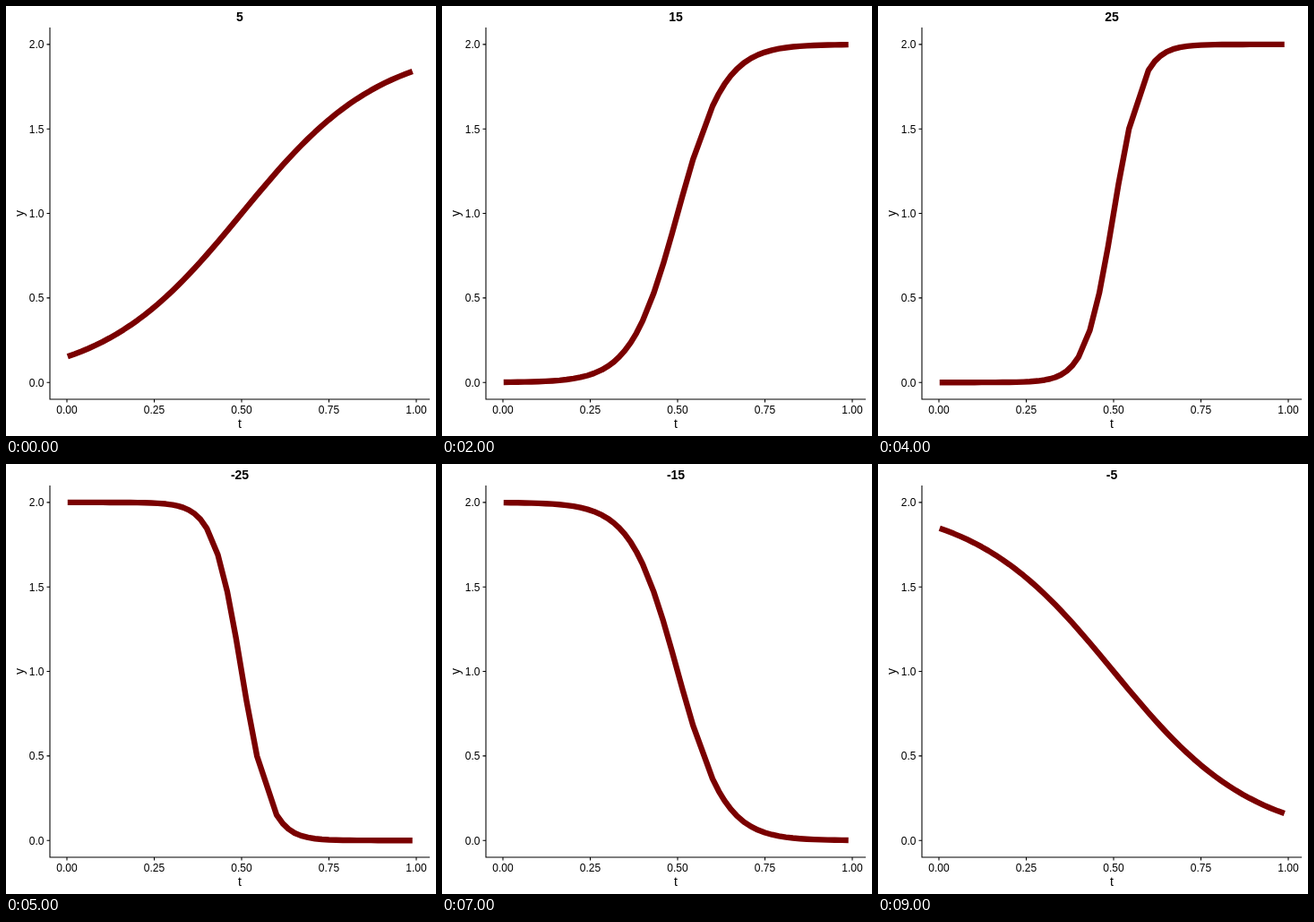
An HTML page for the animation above (10 s loop, 480 by 480 pixels).

```html
<!DOCTYPE html>
<html lang="en">
<head>
<meta charset="utf-8">
<title>Logistic curve</title>
<style>
  html, body { margin: 0; width: 100%; height: 100%; overflow: hidden; background: #fff; }
  svg { display: block; width: 100%; height: 100%; }
  text { font: 12px "Liberation Sans", Arial, sans-serif; text-anchor: middle; }
  .name { font-size: 14px; }
  #title { font-size: 14px; font-weight: bold; }
  #axes { fill: none; stroke: #000; stroke-width: 1.07; }
  #curve { fill: none; stroke: #7a0000; stroke-width: 6.4; stroke-linejoin: round; }
</style>
</head>
<body>
<svg viewBox="0 0 480 480">
  <path id="curve"/>
  <path id="axes"/>
  <g id="labels"></g>
  <text id="title" x="261" y="17"></text>
  <text class="name" x="261" y="471">t</text>
  <text class="name" transform="translate(19.5 231.5) rotate(-90)">y</text>
</svg>
<script>
const STEP = 1000;
const slopes = [5, 10, 15, 20, 25, -25, -20, -15, -10, -5];
const px = t => 68 + 390 * t;
const py = y => 420.2 - 188.65 * y;
const range = (from, to, step) =>
  Array.from({ length: Math.round((to - from) / step) + 1 }, (_, i) => from + i * step);

// Uneven sampling leaves visible corners around the steep middle.
const times = [
  ...range(0.002, 0.242, 0.02), 0.26, 0.283, 0.303, 0.318, 0.333, 0.349, 0.366, 0.382,
  0.4, 0.432, 0.459, 0.484, 0.514, 0.544, 0.6, 0.618, 0.634, 0.652,
  ...range(0.67, 0.97, 0.02), 0.989
];

const byId = id => document.getElementById(id);

function addLabel(value, x, y, anchor) {
  const label = document.createElementNS("http://www.w3.org/2000/svg", "text");
  label.setAttribute("x", x);
  label.setAttribute("y", y);
  label.style.textAnchor = anchor;
  label.textContent = value;
  byId("labels").append(label);
}

function drawAxes() {
  let d = "M49 24V439H473";
  for (const t of range(0, 1, 0.25)) {
    d += `M${px(t)} 439v3.5`;
    addLabel(t.toFixed(2), px(t), 455, "middle");
  }
  for (const y of range(0, 2, 0.5)) {
    d += `M49 ${py(y)}h-3.5`;
    addLabel(y.toFixed(1), 42.5, py(y) + 4.4, "end");
  }
  byId("axes").setAttribute("d", d);
}

function drawCurve(k) {
  const points = times.map(t => {
    const y = 2 / (1 + Math.exp(-k * (t - 0.5)));
    return `${px(t).toFixed(2)} ${py(y).toFixed(2)}`;
  });
  byId("curve").setAttribute("d", "M" + points.join("L"));
  byId("title").textContent = k;
}

let shown = -1;
function tick() {
  const index = Math.floor(performance.now() / STEP) % slopes.length;
  if (index !== shown) drawCurve(slopes[shown = index]);
  requestAnimationFrame(tick);
}

drawAxes();
tick();
</script>
</body>
</html>
```
